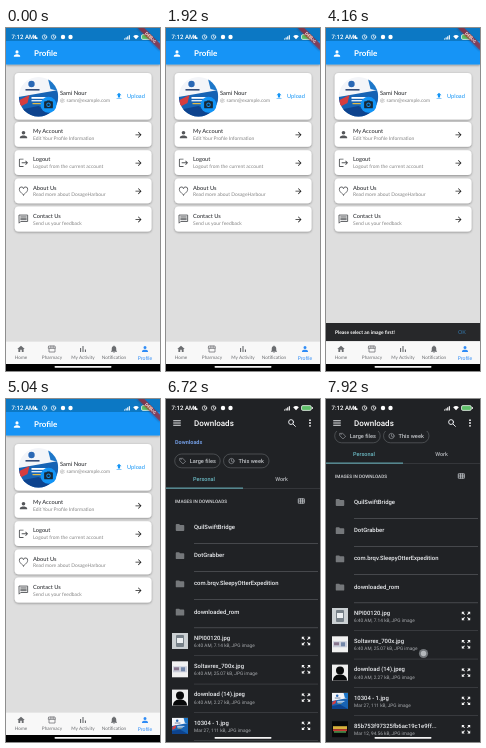
Animation, 154 px wide and 343 px high, one loop 8 s. Source, as an HTML page:

```html
<!DOCTYPE html>
<html lang="en">
<head>
<meta charset="utf-8">
<style>
html, body { margin: 0; width: 100%; height: 100%; overflow: hidden; background: #000; }
svg { display: block; width: 100vw; height: 100vh; }
text { text-rendering: geometricPrecision; white-space: pre; }
.app { font-family: Lato, "Open Sans", sans-serif; }
.files, .status { font-family: Roboto, Inter, sans-serif; }
</style>
</head>
<body>
<svg id="stage" viewBox="0 0 154 343"></svg>
<script>
const BLUE = '#1294f6', INK = '#303236', GREY = '#858585', PALE = '#eceef1', DARK = '#202225', LINE = '#6c6f73', TEAL = '#6cbcc6';

// Icons on a 24-unit grid
const icons = {
  person: 'M12 12a4 4 0 1 0 0-8 4 4 0 0 0 0 8zm0 2c-2.7 0-8 1.3-8 4v2h16v-2c0-2.7-5.3-4-8-4z',
  arrow: 'M12 4l-1.4 1.4 5.6 5.6H4v2h12.2l-5.6 5.6L12 20l8-8z',
  logout: 'M17 7l-1.4 1.4 2.6 2.6H8v2h10.2l-2.6 2.6L17 17l5-5zM4 5h8V3H4a2 2 0 0 0-2 2v14a2 2 0 0 0 2 2h8v-2H4z',
  heart: 'M12 20.5C5 14.5 3 12 3 8.5a4.5 4.5 0 0 1 9-1.5a4.5 4.5 0 0 1 9 1.5c0 3.5-2 6-9 12z',
  message: 'M3 3h18v14H6l-3 3zM6 7h12M6 10h12M6 13h12',
  home: 'M10 20v-6h4v6h5v-8h3L12 3 2 12h3v8z',
  store: 'M4 4h16l1 6H3zM4 10v10h16V10M9 4v6M15 4v6',
  chart: 'M4 9h3v11H4zM10.5 4h3v16h-3zM17 13h3v7h-3z',
  bell: 'M12 22a2 2 0 0 0 2-2h-4a2 2 0 0 0 2 2zm6-6v-5c0-3-1.6-5.6-4.5-6.3V4a1.5 1.5 0 0 0-3 0v.7C7.6 5.4 6 7.9 6 11v5l-2 2v1h16v-1z',
  upload: 'M5 20h14v-2H5zM5 10h4v6h6v-6h4l-7-7z',
  camera: 'M9 2L7.2 4H4a2 2 0 0 0-2 2v12a2 2 0 0 0 2 2h16a2 2 0 0 0 2-2V6a2 2 0 0 0-2-2h-3.2L15 2zM12 17a5 5 0 1 1 0-10 5 5 0 0 1 0 10zM12 15a3 3 0 1 0 0-6 3 3 0 0 0 0 6z',
  folder: 'M10 4H4a2 2 0 0 0-2 2v12a2 2 0 0 0 2 2h16a2 2 0 0 0 2-2V8a2 2 0 0 0-2-2h-8z',
  expand: 'M15 3l2.3 2.3-2.9 2.9 1.4 1.4 2.9-2.9L21 9V3zM3 9l2.3-2.3 2.9 2.9 1.4-1.4-2.9-2.9L9 3H3zM9 21l-2.3-2.3 2.9-2.9-1.4-1.4-2.9 2.9L3 15v6zM21 15l-2.3 2.3-2.9-2.9-1.4 1.4 2.9 2.9L15 21h6z',
  menu: 'M3 6h18M3 12h18M3 18h18',
  search: 'M15 15l6 6M16 9.5a6.5 6.5 0 1 1-13 0 6.5 6.5 0 0 1 13 0z',
  more: 'M12 4v.1M12 12v.1M12 20v.1',
  grid: 'M3 5h18v14H3zM3 12h18M9 5v14M15 5v14',
  clock: 'M21 12a9 9 0 1 1-18 0 9 9 0 0 1 18 0zM12 7v6l4 2',
  tag: 'M3 3h9l10 10-9 9L3 12zM7 7v.1',
  moon: 'M13 3a9 9 0 1 0 8 12A8 8 0 0 1 13 3z',
  wifi: 'M1 9a16 16 0 0 1 22 0L12 21z'
};
const icon = (name, x, y, size, color, line = 0) =>
  `<path d="${icons[name]}" transform="translate(${x - size / 2} ${y - size / 2}) scale(${size / 24})" fill-rule="evenodd" ` +
  (line ? `fill="none" stroke="${color}" stroke-width="${line}" stroke-linecap="round"/>` : `fill="${color}"/>`);
const rect = (x, y, w, h, fill, r = 0, more = '') =>
  `<rect x="${x}" y="${y}" width="${w}" height="${h}" rx="${r}" fill="${fill}" ${more}/>`;
const circle = (x, y, r, fill) => `<circle cx="${x}" cy="${y}" r="${r}" fill="${fill}"/>`;
// y is the vertical middle of the line
const text = (s, x, y, size, fill, weight = 400, anchor = 'start') =>
  `<text x="${x}" y="${y + size * .35}" font-size="${size}" fill="${fill}" font-weight="${weight}" text-anchor="${anchor}">${s}</text>`;
const path = (d, fill) => `<path d="${d}" fill="${fill}"/>`;

const status = `<g class="status">` +
  text('7:12 AM', 5.5, 9, 6.1, '#fff', 500) +
  icon('moon', 30, 9, 5.5, '#fff') + icon('clock', 38.5, 9, 6, '#fff', 2.6) + icon('clock', 47.5, 9, 6, '#fff', 2.6) +
  circle(57, 9, 2.2, '#fff') + circle(64.5, 9, 2.2, '#fff') +
  [0, 1, 2, 3].map(i => rect(118 + i * 1.6, 10.5 - i * 1.1, 1.1, 1 + i * 1.1, '#fff')).join('') +
  icon('wifi', 130, 9, 6.2, '#fff') +
  rect(135.5, 6.6, 9.8, 4.8, '#5fc06a', 1.4, 'stroke="#fff" stroke-width=".7"') + rect(146.1, 8, .8, 2, '#fff') + `</g>`;
const pill = rect(48.5, 338, 57, 1.7, '#f4f4f4', .85);

// Leaflet picture, 40 x 40
const leaflet = rect(0, 0, 40, 40, '#f3f5f9') +
  path('M0 20L40 13V40H0z', '#1763b4') + path('M0 33L20 29 40 40H0z', '#0d438e') +
  path('M29 0H40V14L32 12z', '#1d77c9') + path('M1 23L11 18 9 26 1 30z', '#d63c3e') +
  circle(13, 7, 3.2, '#2a68b5') + rect(7, 12, 14, 1.6, '#334b78') +
  rect(13, 20, 18, 1.8, '#fff') + rect(13, 23, 14, 1.4, '#d9e8f8') + rect(14, 26, 10, 1.2, '#e5bc44');

const rows = [
  ['person', 'My Account', 'Edit Your Profile Information', 94],
  ['logout', 'Logout', 'Logout from the current account', 122.2],
  ['heart', 'About Us', 'Read more about DosageHarbour', 150.4],
  ['message', 'Contact Us', 'Send us your feedback', 178.6]
];
const card = (y, h) => rect(8.7, y, 136.8, h, '#fff', 4, 'filter="url(#shadow)"');
const tabs = [['home', 'Home'], ['store', 'Pharmacy'], ['chart', 'My Activity'], ['bell', 'Notification'], ['person', 'Profile']];

const profile = `<g class="app">` +
  rect(0, 0, 154, 343, '#dedede') +
  rect(0, 0, 154, 36.5, BLUE, 0, 'filter="url(#shadow)"') + rect(0, 0, 154, 13, '#0c78c4') +
  icon('person', 11, 25.5, 9.4, '#fff') + text('Profile', 28, 25, 8, '#fff', 700) +
  card(45, 46.5) +
  `<g clip-path="url(#round)"><g transform="translate(12.5 49)">${leaflet}</g></g>` +
  circle(42.5, 76.8, 8, BLUE) + icon('camera', 42.5, 76.8, 10.5, '#172735') +
  text('Sami Nour', 54, 65, 5.8, INK, 500) + text('@: samn@example.com', 54, 72, 4.9, GREY) +
  icon('upload', 113, 68, 8.5, BLUE) + text('Upload', 121, 68.3, 5.7, BLUE) +
  rows.map(([name, title, note, y]) => card(y, 24.8) +
    icon(name, 17.5, y + 12.6, 11, '#55575a', name === 'heart' || name === 'message' ? 2 : 0) +
    text(title, 27, y + 9.2, 5.7, INK, 500) + text(note, 27, y + 16.2, 4.95, GREY) +
    icon('arrow', 132.5, y + 12.8, 9, '#222')).join('') +
  `<g id="snack">` + rect(0, 295, 154, 18.5, '#27282a') +
  text('Please select an image first!', 9, 304, 4.9, '#fff', 700) + text('OK', 132, 304, 5.4, '#3478ad') + `</g>` +
  rect(0, 313, 154, 23, '#f8f8f8') + rect(0, 313, 154, .5, '#d5d5d5') +
  tabs.map(([name, label], i) => {
    const x = 15 + i * 31, color = i === 4 ? '#2f8cf6' : '#6b6d70';
    return icon(name, x, 321, 9, color, name === 'store' ? 2 : 0) +
      text(label, x, 329.8, i === 4 ? 5.2 : 4.7, color, 400, 'middle');
  }).join('') +
  rect(0, 336, 154, 7, '#000') + pill + status +
  `<g transform="translate(154 0) rotate(45)">` +
  rect(-15.7, 11, 31.4, 4.7, '#b71c1ca0', 0, 'filter="url(#shadow)"') +
  text('DEBUG', 0, 13.3, 3.9, '#fff', 700, 'middle') + `</g></g>`;

const thumbs = [
  rect(0, 0, 16, 16, '#cbd0d3') + rect(4, 2, 8, 12, '#778189', 1) + rect(5, 5, 6, 5, '#edf0f2'),
  rect(0, 0, 16, 16, '#f1f1f1') + rect(1, 5, 14, 6, '#c9cdda') + rect(2, 6, 5, 3, '#87748c') + rect(9, 6, 4, 4, '#7286a8'),
  rect(0, 0, 16, 16, '#eee') + circle(8, 6, 4, '#08090a') + path('M1 16C1 11 5 10 8 10s7 1 7 6z', '#08090a'),
  `<g transform="scale(.4)">${leaflet}</g>`,
  rect(0, 0, 16, 16, '#08090a') + rect(1, 5, 14, 3, '#d8b23c') + rect(1, 8, 14, 2, '#c23a35') + rect(2, 10, 12, 1.5, '#4f9a52')
];
const folders = ['QuilSwiftBridge', 'DotGrabber', 'com.brqv.SleepyOtterExpedition', 'downloaded_rom'];
const files = [
  ['NPI00120.jpg', '6:40 AM, 7.14 kB, JPG image'],
  ['Soltavrex_700x.jpg', '6:40 AM, 25.07 kB, JPG image'],
  ['download (14).jpeg', '6:40 AM, 2.27 kB, JPG image'],
  ['10304 - 1.jpg', 'Mar 27, 111 kB, JPG image'],
  ['85b753f97325fb6ac19c1e9ff...', 'Mar 12, 94.56 kB, JPG image']
];
const chip = (x, name, label) =>
  rect(x, 55, 45.5, 13.8, 'none', 6.9, 'stroke="#65686c" stroke-width=".6"') +
  icon(name, x + 8, 62, 7, '#a9adb1', 2) + text(label, x + 15, 62, 5.6, '#c2c5c9', 500);

const picker = `<g id="picker" class="files">` + rect(0, 0, 154, 343, DARK) + `<g id="list">` +
  text('Downloads', 9, 42.8, 5.5, '#719be0', 700) +
  chip(8.7, 'tag', 'Large files') + chip(57.5, 'clock', 'This week') +
  text('Personal', 38, 80.5, 5.5, TEAL, 500, 'middle') + text('Work', 115.5, 80.5, 5.5, '#b2b5b9', 500, 'middle') +
  rect(0, 89.3, 154, .5, '#484b4e') + rect(0, 88.6, 77, 1, TEAL) +
  text('IMAGES IN DOWNLOADS', 9, 102, 4.65, '#d6d8db', 500) + icon('grid', 135.5, 102, 7.5, '#c9ccd0', 2.4) +
  folders.map((name, i) => {
    const y = 128 + i * 28.2;
    return icon('folder', 14, y + .5, 10.2, '#75787b') + text(name, 28, y, 5.9, PALE, 500) + rect(28, y + 16, 124, .5, LINE);
  }).join('') +
  files.map(([name, note], i) => {
    const y = 242 + i * 28.3;
    return `<g transform="translate(6 ${y - 8})">${thumbs[i]}</g>` +
      text(name, 28, y - 3.2, 5.9, PALE, 500) + text(note, 28, y + 4.4, 4.75, '#a8abaf') +
      icon('expand', 140, y, 11.2, '#fff') + rect(28, y + 14.5, 124, .5, '#505356');
  }).join('') + `</g>` +
  rect(0, 0, 154, 32, DARK) + status +
  icon('menu', 11, 24, 9, PALE, 2.6) + text('Downloads', 28, 24, 8, '#fff', 500) +
  icon('search', 126, 24, 9, PALE, 2.6) + icon('more', 144, 24, 8.5, '#fff', 5) + pill +
  `<g id="touch">` + circle(0, 0, 4.6, '#a9adb399') + circle(0, 0, 2.7, '#e1e4e799') + `</g></g>`;

const byId = id => document.getElementById(id);
byId('stage').innerHTML = `<defs><clipPath id="round"><circle cx="32.5" cy="68.7" r="19.7"/></clipPath>
  <filter id="shadow" x="-5%" y="-20%" width="110%" height="150%"><feDropShadow dx="0" dy=".8" stdDeviation="1" flood-opacity=".4"/></filter></defs>` +
  profile + picker;

const snack = byId('snack'), pick = byId('picker'), list = byId('list'), touch = byId('touch');
const ramp = (t, from, to) => Math.min(1, Math.max(0, (t - from) / (to - from)));
const ease = p => p * p * (3 - 2 * p);

function draw(now) {
  const t = now % 8000;
  const shown = ease(ramp(t, 2640, 2890)) - ease(ramp(t, 4640, 4890));
  snack.setAttribute('transform', `translate(0 ${19 * (1 - shown)})`);
  pick.setAttribute('opacity', ease(ramp(t, 6360, 6500)));
  const scroll = 25 * ease(ramp(t, 7480, 7900));
  list.setAttribute('transform', `translate(0 ${-scroll})`);
  touch.setAttribute('transform', `translate(97.5 ${279.5 - scroll})`);
  touch.setAttribute('opacity', t >= 7440 ? 1 : 0);
}
function tick() {
  draw(performance.now());
  requestAnimationFrame(tick);
}
tick();
</script>
</body>
</html>
```
